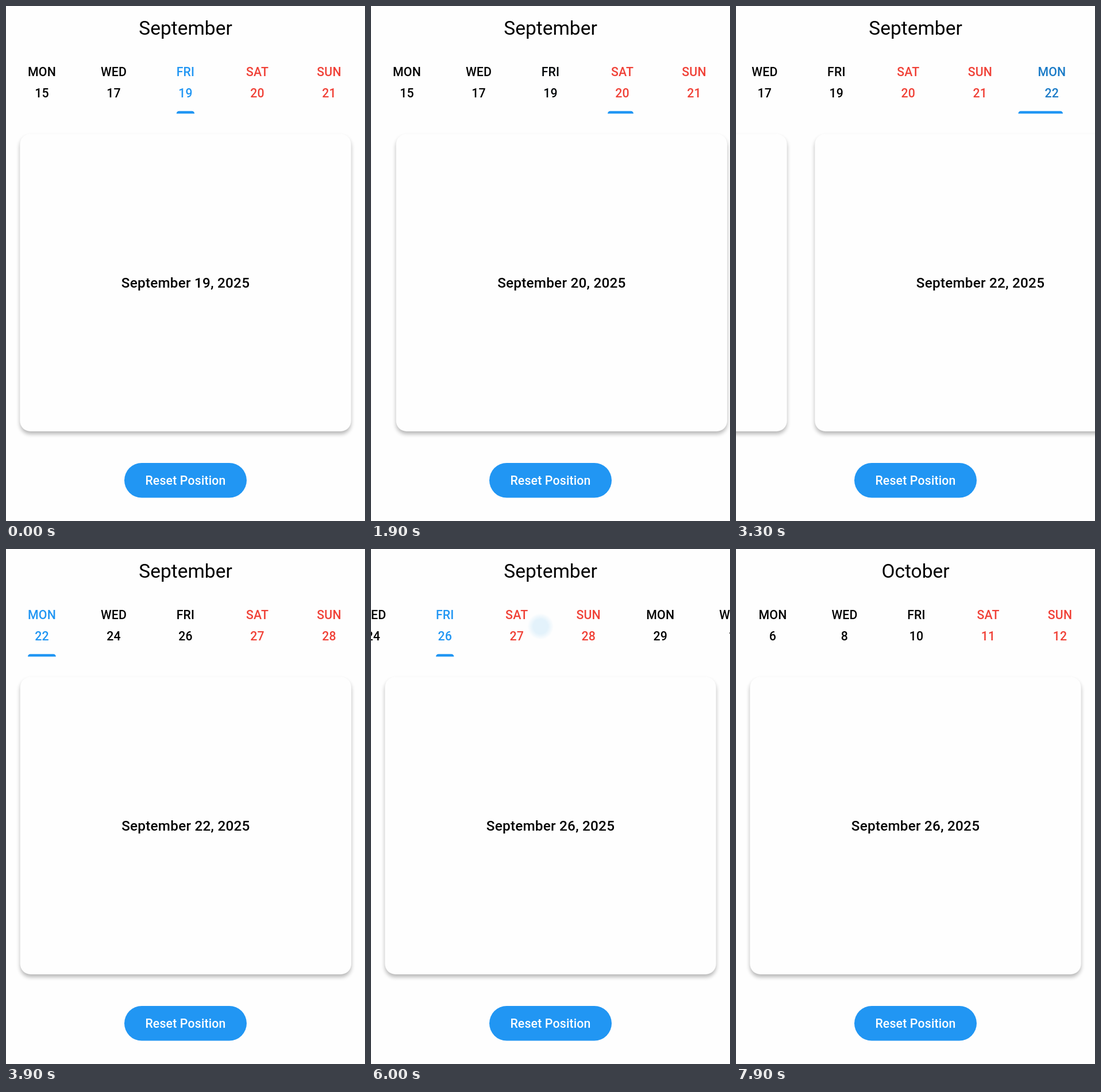
These frames come from a looping animation (625 px wide and 896 px high, 8000 ms). An HTML page:

```html
<!DOCTYPE html>
<html lang="en">
<head>
<meta charset="utf-8">
<title>Week calendar</title>
<style>
html, body { margin: 0; width: 100%; height: 100%; overflow: hidden; background: #fefefe; }
svg { display: block; width: 625px; height: 896px; }
text { font-family: Roboto, sans-serif; font-weight: 500; text-anchor: middle; }
.day { font-size: 21.3px; letter-spacing: .15px; }
.date { font-size: 24.3px; letter-spacing: .23px; }
.month { font-size: 33.5px; font-weight: 400; }
</style>
</head>
<body>
<svg viewBox="0 0 625 896">
  <defs>
    <filter id="soft" x="-5%" y="-5%" width="110%" height="110%">
      <feGaussianBlur stdDeviation="3.8"/>
    </filter>
    <radialGradient id="glow">
      <stop offset=".55" stop-color="#e3f2fb"/>
      <stop offset="1" stop-color="#e3f2fb" stop-opacity="0"/>
    </radialGradient>
  </defs>
  <rect width="625" height="896" fill="#fefefe"/>
  <text id="month" class="month" x="312.5" y="49.5"></text>
  <g id="strip"><path id="bar" fill="#2196f3"/></g>
  <g id="cards"></g>
  <rect x="206" y="795" width="213" height="60.5" rx="30.25" fill="#2196f3"/>
  <text class="day" x="312.5" y="832.5" fill="#fff">Reset Position</text>
  <circle id="touch" r="23" fill="url(#glow)"/>
</svg>
<script>
const LOOP = 8000, W = 625, STEP = 125, FIRST = 2;
const NAMES = ['MON', 'WED', 'FRI', 'SAT', 'SUN'];
const OFFSETS = [0, 2, 4, 5, 6];
const HALF = [24.4, 22.9, 15.7, 19.6, 21.1];
const RED = '#f04137';

// [release time in s, distance left at release, speed]
const SLOW = [445, 3800], MID = [420, 4500], FAST = [400, 6000];
const cardSwipes = [[1.551, ...SLOW], [2.310, ...FAST], [3.205, ...FAST], [4.3, ...MID], [5.11, ...FAST]];
const weekSwipes = [[6, ...SLOW], [7.294, ...MID]];

const $ = id => document.getElementById(id);
const clamp = (v, a = 0, b = 1) => Math.min(b, Math.max(a, v));

function add(parent, tag, attrs, text = '') {
  const el = document.createElementNS('http://www.w3.org/2000/svg', tag);
  for (const k in attrs) el.setAttribute(k, attrs[k]);
  el.textContent = text;
  parent.append(el);
  return el;
}

const dateOf = i => new Date(2025, 8, 15 + 7 * Math.floor(i / 5) + OFFSETS[i % 5]);
const monthOf = d => d.toLocaleString('en-US', { month: 'long' });
const center = i => STEP * (i + .5);

const dragTime = ([, left, speed]) => 2 * (W - left) / speed;

// Finger drag, then an overdamped page spring; returns 0..1
function swipe(t, s) {
  const [end, left, speed] = s, u = t - end, d = dragTime(s);
  if (u <= -d) return 0;
  if (u < 0) return (1 - left / W) * ((u + d) / d) ** 2;
  const a = 9.07, b = 22.07;
  const c = (speed - a * left) / (b - a);
  const rest = (left - c) * Math.exp(-a * u) + c * Math.exp(-b * u);
  return rest < .25 ? 1 : 1 - rest / W;
}
const total = (t, list) => list.reduce((sum, s) => sum + swipe(t, s), 0);

const labels = [];
for (let i = 0; i < 20; i++) {
  const g = add($('strip'), 'g', { fill: i % 5 > 2 ? RED : '#000' });
  add(g, 'text', { class: 'day', x: center(i), y: 122 }, NAMES[i % 5]);
  add(g, 'text', { class: 'day', x: center(i), y: 158.5 }, dateOf(i).getDate());
  labels.push(g);
}

const box = { x: 24.3, y: 222.5, width: 576.4, height: 517.5, rx: 18.2 };
for (let i = FIRST; i < 8; i++) {
  const g = add($('cards'), 'g', { transform: `translate(${(i - FIRST) * W} 0)` });
  add(g, 'rect', { ...box, y: box.y + 4.8, opacity: .28, filter: 'url(#soft)' });
  add(g, 'rect', { ...box, fill: '#fefefe' });
  const d = dateOf(i);
  add(g, 'text', { class: 'date', x: 312.5, y: 490 }, `${monthOf(d)} ${d.getDate()}, ${d.getFullYear()}`);
}

function drawBar(page) {
  const i = Math.floor(page), a = (page - i) * Math.PI / 2;
  const edge = (k, side) => center(k) + side * HALF[k % 5];
  const mix = (side, f) => edge(i, side) + (edge(i + 1, side) - edge(i, side)) * f;
  const l = mix(-1, 1 - Math.cos(a)), r = mix(1, Math.sin(a));
  $('bar').setAttribute('d', `M${l} 187.3A4.6 4.6 0 0 1 ${l + 4.6} 182.7H${r - 4.6}A4.6 4.6 0 0 1 ${r} 187.3Z`);
}

function drawTouch(t, shift) {
  const el = $('touch');
  const s = weekSwipes.find(s => t > s[0] - dragTime(s) - .03 && t < s[0] + .2);
  el.setAttribute('opacity', s ? clamp(1 - (t - s[0] - .02) / .15) : 0);
  if (!s) return;
  const u = t - s[0];
  const x = u < 0 ? 476 - shift : 31 + s[1] - 180 - 900 * u;
  el.setAttribute('cx', x);
  el.setAttribute('cy', 135 - 250 * u);
}

function draw(ms) {
  const t = ms / 1000;
  const page = FIRST + total(t, cardSwipes);
  const turn = clamp((t - 3.21) / .3);
  const manual = total(t, weekSwipes);
  const week = turn * turn * (3 - 2 * turn) + manual;

  $('month').textContent = monthOf(dateOf(5 * Math.round(week)));
  $('strip').setAttribute('transform', `translate(${-week * W} 0)`);
  $('cards').setAttribute('transform', `translate(${(FIRST - page) * W} 0)`);
  labels.forEach((g, i) => {
    if (i % 5 > 2) return;
    const k = clamp(1 - Math.abs(page - i));
    g.setAttribute('fill', `rgb(${33 * k},${150 * k},${243 * k})`);
  });
  drawBar(page);
  drawTouch(t, (manual % 1) * W);
}

const start = performance.now();
function tick() {
  draw((performance.now() - start) % LOOP);
  requestAnimationFrame(tick);
}
tick();
</script>
</body>
</html>
```
